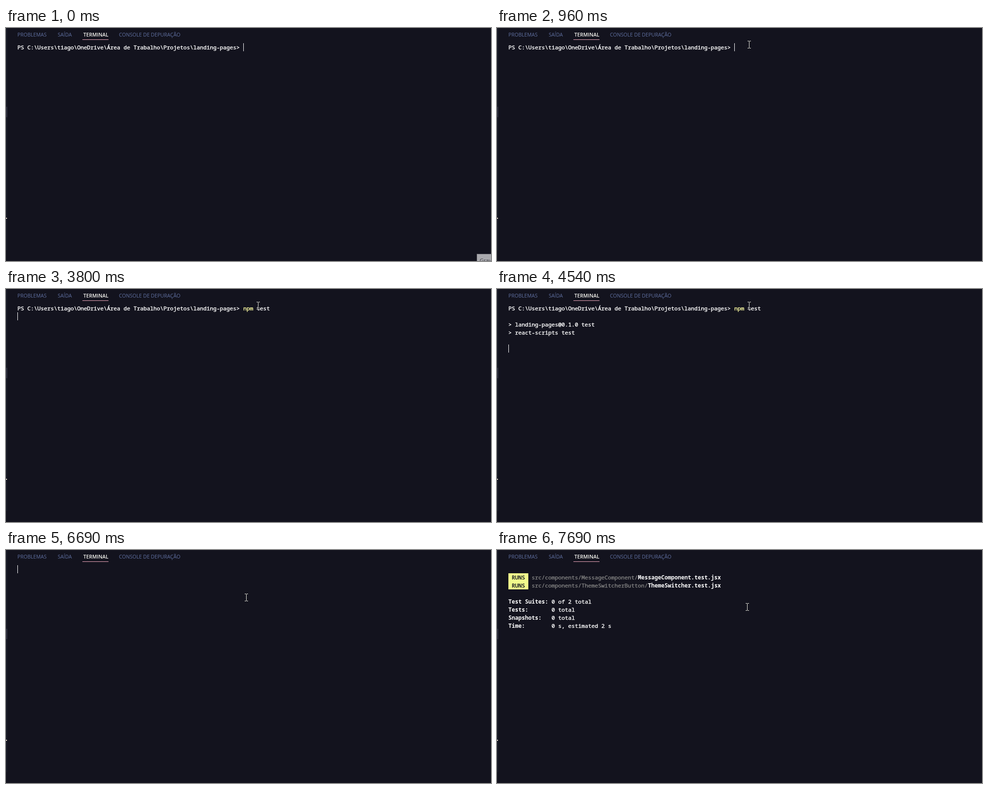
An HTML page with a canvas that plays this animation: 1022 px wide and 491 px high, repeating every 8000 ms.

```html
<!DOCTYPE html>
<html lang="pt">
<head>
<meta charset="utf-8">
<title>Terminal</title>
<style>
  html, body { margin: 0; width: 100%; height: 100%; overflow: hidden; background: #13131e; }
  canvas { display: block; }
</style>
</head>
<body>
<canvas id="stage" width="1022" height="491"></canvas>
<script>
const ctx = document.getElementById('stage').getContext('2d');
const LOOP = 8000, LEFT = 24, TOP = 32, CELL = 7, ROW = 17;
const BG = '#13131e', WHITE = '#ffffff', MUTED = '#6070a1', DIM = '#808080', YELLOW = '#f1fa8c';
const MONO = '11.667px "Noto Sans Mono", "DejaVu Sans Mono", monospace';
const UI = '10.6px "Open Sans", "Noto Sans", sans-serif';
const PROMPT = 'PS C:\\Users\\tiago\\OneDrive\\Área de Trabalho\\Projetos\\landing-pages> ';
const COMMAND = 'npm test';
const keyTimes = [1550, 1880, 2150, 2480, 2810, 2880, 3080, 3200];

const ENTER = 3800, SCRIPT = 4540, CLEAR = 6690, SUMMARY = 6890, RUNS = 7020;

// text cursor after Enter: time, row, column (-1 = blinked off)
const carets = [
  [ENTER, 1, 0], [SCRIPT, 5, 0], [5270, 5, -1], [5800, 5, 0], [6420, 5, -1],
  [CLEAR, 0, 0], [SUMMARY, 5, 31], [RUNS, 7, 31], [7490, 7, -1]
];

// pointer: time, x, y
const pointer = [
  [69, 1012, 508], [70, 990, 485], [205, 904, 407], [340, 813, 313], [407, 749, 249],
  [475, 687, 200], [540, 599, 133], [610, 567, 112], [810, 536, 42], [880, 520, 45],
  [960, 531, 35], [5799, 531, 35], [5800, 469, 92], [6230, 496, 102], [6420, 501, 101],
  [6490, 506, 100], [6890, 506, 100], [6960, 508, 100], [7150, 508, 100], [7690, 527, 120]
];

function box(x, y, w, h, color) {
  ctx.fillStyle = color;
  ctx.fillRect(x, y, w, h);
}

function label(text, x, y, color, font) {
  ctx.font = font;
  ctx.fillStyle = color;
  ctx.fillText(text, x, y);
}

// terminal text; regular weight gets a hairline outline for sturdier stems
function put(row, col, text, color = WHITE, weight = 'normal') {
  const x = LEFT + col * CELL, y = TOP + row * ROW + 13;
  label(text, x, y, color, weight + ' ' + MONO);
  if (weight === 'bold') return;
  ctx.strokeStyle = color;
  ctx.lineWidth = 0.4;
  ctx.strokeText(text, x, y);
}

function drawPanel() {
  box(0, 0, 1022, 491, BG);
  box(0, 0, 3, 468, '#181925');
  box(0, 166, 3, 22, '#2b2c3b');
  box(0, 400, 2, 2, '#fff0dc');
  label('PROBLEMAS', 24, 18, MUTED, UI);
  label('SAÍDA', 109, 18, MUTED, UI);
  label('TERMINAL', 163, 18, '#f8f8f2', '600 ' + UI);
  label('CONSOLE DE DEPURAÇÃO', 238, 18, MUTED, UI);
  box(161, 24, 55, 1, '#f0a8bd');
}

function drawTooltip() {
  box(992, 476, 30, 15, '#7c7c82');
  box(993, 477, 29, 14, '#a9a9ae');
  label('Grav', 998, 494, '#3a3a40', '11.5px "Open Sans", "Noto Sans", sans-serif');
}

function drawSummary(row) {
  const lines = [
    ['Test Suites:', '0 of 2 total'], ['Tests:', '0 total'],
    ['Snapshots:', '0 total'], ['Time:', '0 s, estimated 2 s']
  ];
  lines.forEach(([name, value], i) => {
    put(row + i, 0, name, WHITE, 'bold');
    put(row + i, 13, value);
  });
}

function drawRun(row, path, file) {
  box(LEFT, TOP + row * ROW, 6 * CELL, ROW, YELLOW);
  put(row, 1, 'RUNS', BG);
  put(row, 7, path, DIM);
  put(row, 7 + path.length, file, WHITE, 'bold');
}

function drawCaret(row, col) {
  box(LEFT + col * CELL, TOP + row * ROW, 1, ROW, WHITE);
}

function drawText(t) {
  if (t < CLEAR) {
    const typed = COMMAND.slice(0, keyTimes.filter(k => k <= t).length);
    const start = PROMPT.length;
    put(0, 0, PROMPT);
    put(0, start, typed.slice(0, 3), '#ffffa5');
    put(0, start + 4, typed.slice(4));
    if (t < ENTER) drawCaret(0, start + typed.length);
    if (t >= SCRIPT) {
      put(2, 0, '> landing-pages@0.1.0 test');
      put(3, 0, '> react-scripts test');
    }
  } else if (t >= RUNS) {
    drawRun(1, 'src/components/MessageComponent/', 'MessageComponent.test.jsx');
    drawRun(2, 'src/components/ThemeSwitcherButton/', 'ThemeSwitcher.test.jsx');
    drawSummary(4);
  } else if (t >= SUMMARY) {
    drawSummary(2);
  }
  const caret = carets.filter(c => c[0] <= t).pop();
  if (caret && caret[2] >= 0) drawCaret(caret[1], caret[2]);
}

function pointerAt(t) {
  const next = pointer.findIndex(p => p[0] > t);
  if (next < 0) return pointer[pointer.length - 1].slice(1);
  if (next === 0) return pointer[0].slice(1);
  const [a, b] = [pointer[next - 1], pointer[next]];
  const k = (t - a[0]) / (b[0] - a[0]);
  return [1, 2].map(i => Math.round(a[i] + (b[i] - a[i]) * k));
}

// I-beam that inverts what lies below it
function drawPointer(t) {
  const [x, y] = pointerAt(t);
  ctx.globalCompositeOperation = 'difference';
  box(x, y - 7, 1, 14, WHITE);
  for (const edge of [y - 8, y + 7]) {
    box(x - 3, edge, 3, 1, WHITE);
    box(x + 1, edge, 3, 1, WHITE);
  }
  ctx.globalCompositeOperation = 'source-over';
}

// the first sweep of the pointer is sampled about 15 times a second
const sample = t => t >= 70 && t < 810 ? 70 + Math.floor((t - 70) / 67.3) * 67.3 : t;

let begin;
function frame(now) {
  begin ??= now;
  const t = (now - begin) % LOOP;
  drawPanel();
  if (t < 137) drawTooltip();
  drawText(t);
  drawPointer(sample(t));
  requestAnimationFrame(frame);
}
requestAnimationFrame(frame);
</script>
</body>
</html>
```
